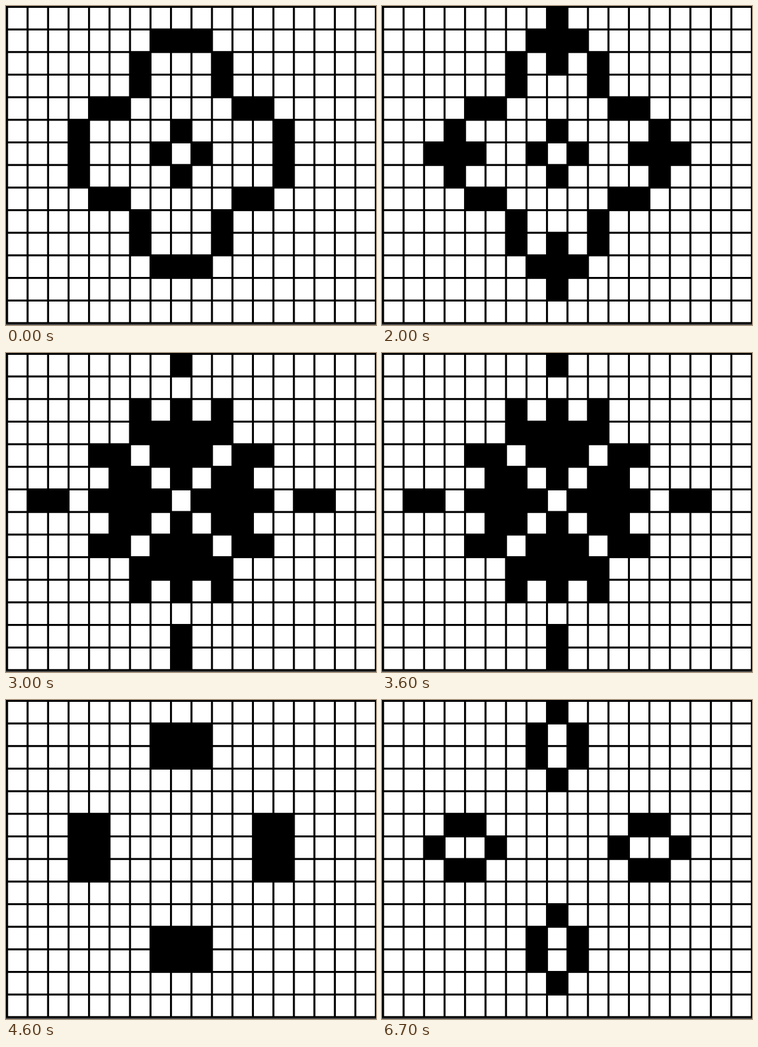
Animation of 600 by 518 pixels, one loop 6.8 s. Source, as an HTML page with a canvas:

```html
<!DOCTYPE html>
<html lang="en">
<head>
<meta charset="utf-8">
<title>Game of Life</title>
<style>
  html, body { margin: 0; width: 100%; height: 100%; overflow: hidden; background: #000; }
  canvas { display: block; }
</style>
</head>
<body>
<canvas id="board" width="600" height="518"></canvas>
<script>
const LOOP = 6800;
const STARTS = [0, 1300, 2200, 3000, 3800, 4600, 5400];
const COLS = 18, ROWS = 14, PAD = 3;
const CENTER = { x: 8, y: 6 };
const CELL = { x: 3.4, y: 3, dx: 33.22, dy: 36.68, w: 30, h: 33.5 };

// One quadrant of the seed, mirrored around the center cell.
const QUADRANT = [[0, 5], [1, 5], [2, 4], [2, 3], [3, 2], [4, 2], [5, 1], [5, 0], [0, 1], [1, 0]];

const key = (x, y) => x + "," + y;

function seed() {
  const live = new Set();
  for (const [x, y] of QUADRANT)
    for (const sx of [-1, 1])
      for (const sy of [-1, 1])
        live.add(key(CENTER.x + sx * x, CENTER.y + sy * y));
  return live;
}

function neighbours(live, x, y) {
  let n = 0;
  for (let j = -1; j <= 1; j++)
    for (let i = -1; i <= 1; i++)
      if ((i || j) && live.has(key(x + i, y + j))) n++;
  return n;
}

function evolve(live) {
  const next = new Set();
  for (let y = -PAD; y < ROWS + PAD; y++)
    for (let x = -PAD; x < COLS + PAD; x++) {
      const n = neighbours(live, x, y);
      if (n === 3 || (n === 2 && live.has(key(x, y)))) next.add(key(x, y));
    }
  return next;
}

const generations = [seed()];
while (generations.length < STARTS.length) generations.push(evolve(generations.at(-1)));

const ctx = document.getElementById("board").getContext("2d");

function draw(live) {
  ctx.fillStyle = "#000";
  ctx.fillRect(0, 0, 600, 518);
  ctx.fillStyle = "#444";
  ctx.fillRect(0, 516, 600, 2);
  ctx.fillStyle = "#fff";
  for (let y = 0; y < ROWS; y++)
    for (let x = 0; x < COLS; x++)
      if (!live.has(key(x, y)))
        ctx.fillRect(CELL.x + x * CELL.dx, CELL.y + y * CELL.dy, CELL.w, CELL.h);
}

const origin = performance.now();
let shown = -1;

function tick() {
  const t = (performance.now() - origin) % LOOP;
  const step = STARTS.filter(s => s <= t).length - 1;
  if (step !== shown) draw(generations[shown = step]);
  requestAnimationFrame(tick);
}
tick();
</script>
</body>
</html>
```
